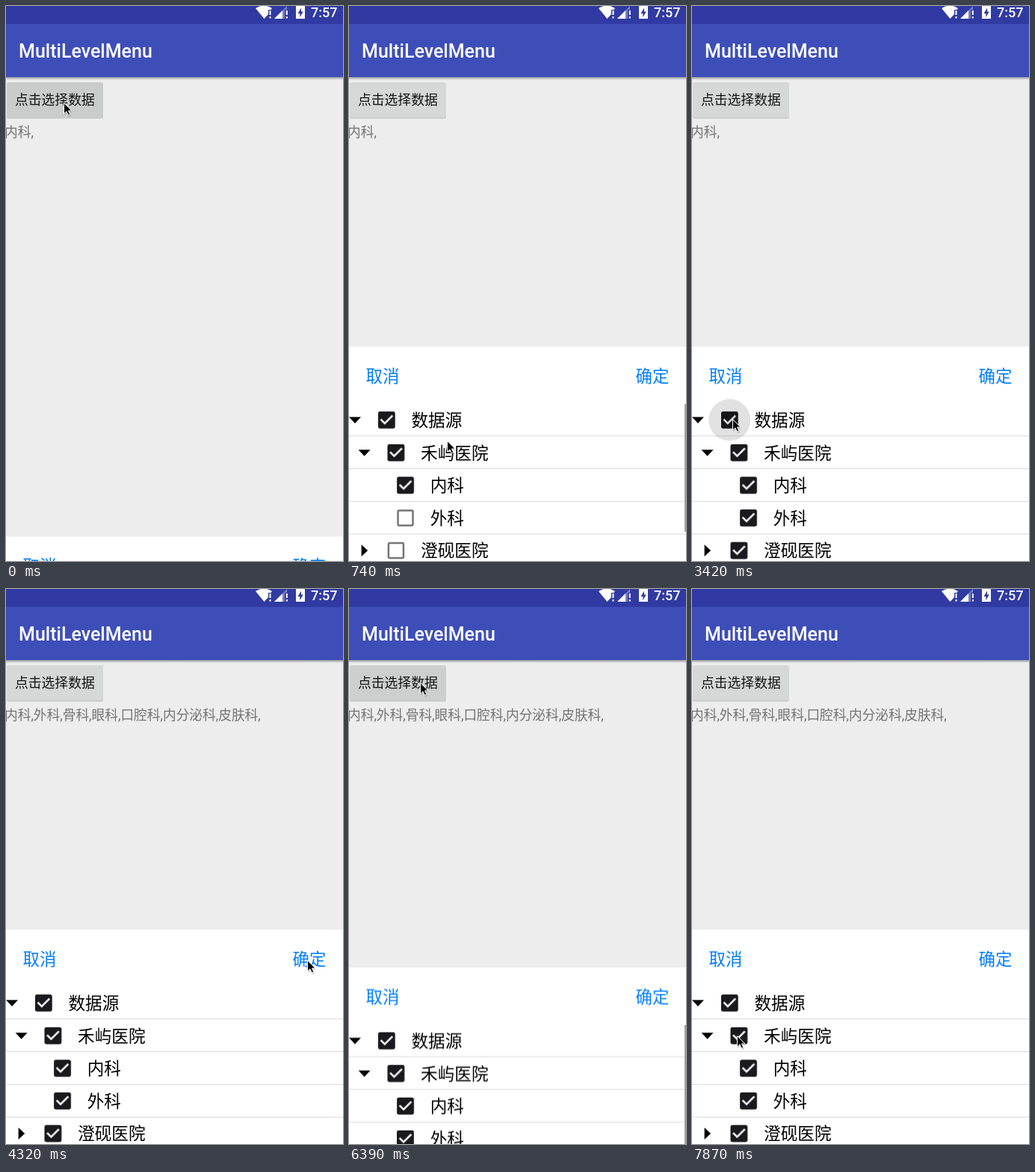
An HTML page for the animation above (8000 ms loop, 451 by 742 pixels).

```html
<!DOCTYPE html>
<html lang="zh-CN">
<head>
<meta charset="utf-8">
<title>MultiLevelMenu</title>
<style>
  html, body { margin: 0; width: 100%; height: 100%; overflow: hidden; background: #ededed; }
  svg { display: block; width: 451px; height: 742px; font-family: Roboto, "Noto Sans CJK SC", "Noto Sans CJK", sans-serif; }
  .anim { animation: 8s step-end -20ms infinite; }

  .press { animation-name: press; }
  .picked { animation-name: picked; }
  .sheet { animation-name: sheet; }
  .bar { animation-name: bar; }
  .was-on { animation-name: was-on; }
  .was-off { animation-name: was-off; }
  .ripple { animation-name: ripple; }
  .cursor { animation-name: cursor; }

  .action { font-size: 22.4px; fill: #007dff; }
  .row text { font-size: 22.6px; fill: #000; }
  .row path { fill: #808080; }
  .lines path { stroke: #dadada; stroke-width: 1; }

  @keyframes press {
    0%, 78.125% { fill: #c9cccb; }
    1.875%, 79.875% { fill: #cccfce; }
    76.25% { fill: #cfd1d1; }
    3.75%, 81.75%, 100% { fill: #d6d8d7; }
  }
  @keyframes picked {
    0% { fill: transparent; }
    54%, 100% { fill: #737373; }
  }
  @keyframes sheet {
    0%, 78.125% { transform: translateY(254px); }
    1.875%, 79.875% { transform: translateY(50.5px); }
    55.875% { transform: translateY(119px); }
    57.75% { transform: translateY(290px); }
    3.75%, 81.75%, 100% { transform: translateY(0); }
  }
  @keyframes bar {
    0%, 78.125% { opacity: 1; }
    14.75%, 92.75% { opacity: .5; }
    16.625%, 94.625%, 100% { opacity: 0; }
  }
  @keyframes was-on {
    0%, 42.75%, 100% { opacity: 1; }
    33.375% { opacity: 0; }
  }
  @keyframes was-off {
    0% { opacity: 0; }
    42.75%, 100% { opacity: 1; }
  }
  @keyframes ripple {
    33.375%, 42.75% { opacity: .12; }
    35.25%, 44.625% { opacity: .08; }
    37.125%, 46.5% { opacity: .03; }
    0%, 39%, 48.375%, 100% { opacity: 0; }
  }
  @keyframes cursor {
    0% { transform: translate(77px, 129px); }
    5.625% { transform: translate(88px, 175px); }
    7.375% { transform: translate(121px, 400px); }
    9.25% { transform: translate(131px, 581px); }
    11.125% { transform: translate(119px, 628px); }
    13% { transform: translate(90px, 664px); }
    14.75% { transform: translate(69px, 677px); }
    16.625% { transform: translate(76px, 681px); }
    26% { transform: translate(74px, 668px); }
    27.875% { transform: translate(63px, 603px); }
    29.75% { transform: translate(54px, 552px); }
    48.375% { transform: translate(72px, 548px); }
    50.25% { transform: translate(190px, 526px); }
    52.125% { transform: translate(345px, 503px); }
    54% { transform: translate(403px, 496px); }
    61.375% { transform: translate(388px, 475px); }
    63.25% { transform: translate(300px, 365px); }
    65% { transform: translate(175px, 215px); }
    66.875% { transform: translate(106px, 137px); }
    68.75% { transform: translate(95px, 125px); }
    85.375% { transform: translate(98px, 140px); }
    87.25% { transform: translate(106px, 235px); }
    89.125% { transform: translate(102px, 385px); }
    91% { transform: translate(84px, 510px); }
    92.75% { transform: translate(68px, 572px); }
    94.625% { transform: translate(58px, 594px); }
    96.5%, 100% { transform: translate(60px, 597px); }
  }
</style>
</head>
<body>
<svg viewBox="0 0 451 742">
  <defs>
    <linearGradient id="shade" x2="0" y2="1">
      <stop stop-color="#9a9a9f"/>
      <stop offset="1" stop-color="#ededed"/>
    </linearGradient>
    <!-- Checkboxes and arrows are centred on 0,0 -->
    <rect id="off" x="-10" y="-10" width="20" height="20" rx="1.2" fill="#fff" stroke="#757575" stroke-width="2.5"/>
    <g id="on" transform="scale(1.253) translate(-12 -12)">
      <rect x="3" y="3" width="18" height="18" rx="2" fill="#1a191e"/>
      <path d="M10 17l-5-5 1.41-1.41L10 14.17l7.59-7.59L19 8z" style="fill:#fff"/>
    </g>
    <path id="open" d="M-8 -4H8L0 4.5Z"/>
    <path id="shut" d="M-4 -8V8L4.5 0Z"/>
  </defs>

  <rect width="451" height="742" fill="#ededed"/>
  <rect y="95" width="451" height="4" fill="url(#shade)"/>
  <rect y="24" width="451" height="71" fill="#3e4eb8"/>
  <rect width="451" height="24" fill="#303aa2"/>

  <g fill="#fff">
    <path d="M334 3Q345 -4 356 3L354.5 5H351V11L345.5 17Z"/>
    <path d="M352.5 6h2v6h-2zM352.5 14h2v2.5h-2zM374.8 6h2v6h-2zM374.8 14h2v2.5h-2z"/>
    <path d="M359 17L376 0V5H373V17Z" opacity=".35"/>
    <path d="M359 17L370 6V17Z"/>
    <path d="M388 0h3v-1h6v1h3v17h-12z"/>
    <path d="M395 2.5L390.5 10H393.3V15L397.8 7.5H395Z" fill="#303aa2"/>
    <text x="408" y="15" font-size="18" font-weight="500">7:57</text>
    <text x="17" y="69" font-size="25" font-weight="500">MultiLevelMenu</text>
  </g>

  <rect x="1" y="103.5" width="129" height="47" rx="2.5" fill="#bcbcbc" opacity=".8"/>
  <rect class="anim press" x="1" y="102" width="129" height="47" rx="2.5"/>
  <text x="12" y="132.4" font-size="17.8" font-weight="500" fill="#141414">点击选择数据</text>
  <text x="-2" y="175" font-size="17.7" fill="#737373">内科,<tspan class="anim picked">外科,骨科,眼科,口腔科,内分泌科,皮肤科,</tspan></text>

  <g class="anim sheet">
    <rect y="455.5" width="451" height="300" fill="#fff"/>
    <text class="action" x="22.5" y="502.7">取消</text>
    <text class="action" x="383.5" y="502.7">确定</text>
    <g class="lines">
      <path d="M0 574.8H451M0 618.5H451M0 662.3H451M0 706H451"/>
    </g>

    <g class="row" transform="translate(0 553.5)">
      <use href="#open" x="8"/>
      <use href="#off" x="50.3"/>
      <use href="#on" x="50.3" class="anim was-on"/>
      <circle class="anim ripple" cx="50.3" r="28"/>
      <text x="83.5" y="8.4">数据源</text>
    </g>
    <g class="row" transform="translate(12.6 597.2)">
      <use href="#open" x="8"/>
      <use href="#off" x="50.3"/>
      <use href="#on" x="50.3" class="anim was-on"/>
      <text x="83.5" y="8.4">禾屿医院</text>
    </g>
    <g class="row" transform="translate(25.2 640.8)">
      <use href="#off" x="50.3"/>
      <use href="#on" x="50.3" class="anim was-on"/>
      <text x="83.5" y="8.4">内科</text>
    </g>
    <g class="row" transform="translate(25.2 684.4)">
      <use href="#off" x="50.3"/>
      <use href="#on" x="50.3" class="anim was-off"/>
      <text x="83.5" y="8.4">外科</text>
    </g>
    <g class="row" transform="translate(12.6 728)">
      <use href="#shut" x="8"/>
      <use href="#off" x="50.3"/>
      <use href="#on" x="50.3" class="anim was-off"/>
      <text x="83.5" y="8.4">澄砚医院</text>
    </g>
    <rect class="anim bar" x="449" y="532" width="2" height="171" fill="#a0a0a0"/>
  </g>

  <g class="anim cursor">
    <path d="M1 2V17L4.5 14L7 19L10 18L7.7 13H12Z" opacity=".2"/>
    <path d="M.5 .5V15L3.9 11.9L6.3 17L8.8 15.9L6.5 11H11Z" stroke="#fff" stroke-width="1"/>
  </g>
</svg>
</body>
</html>
```
